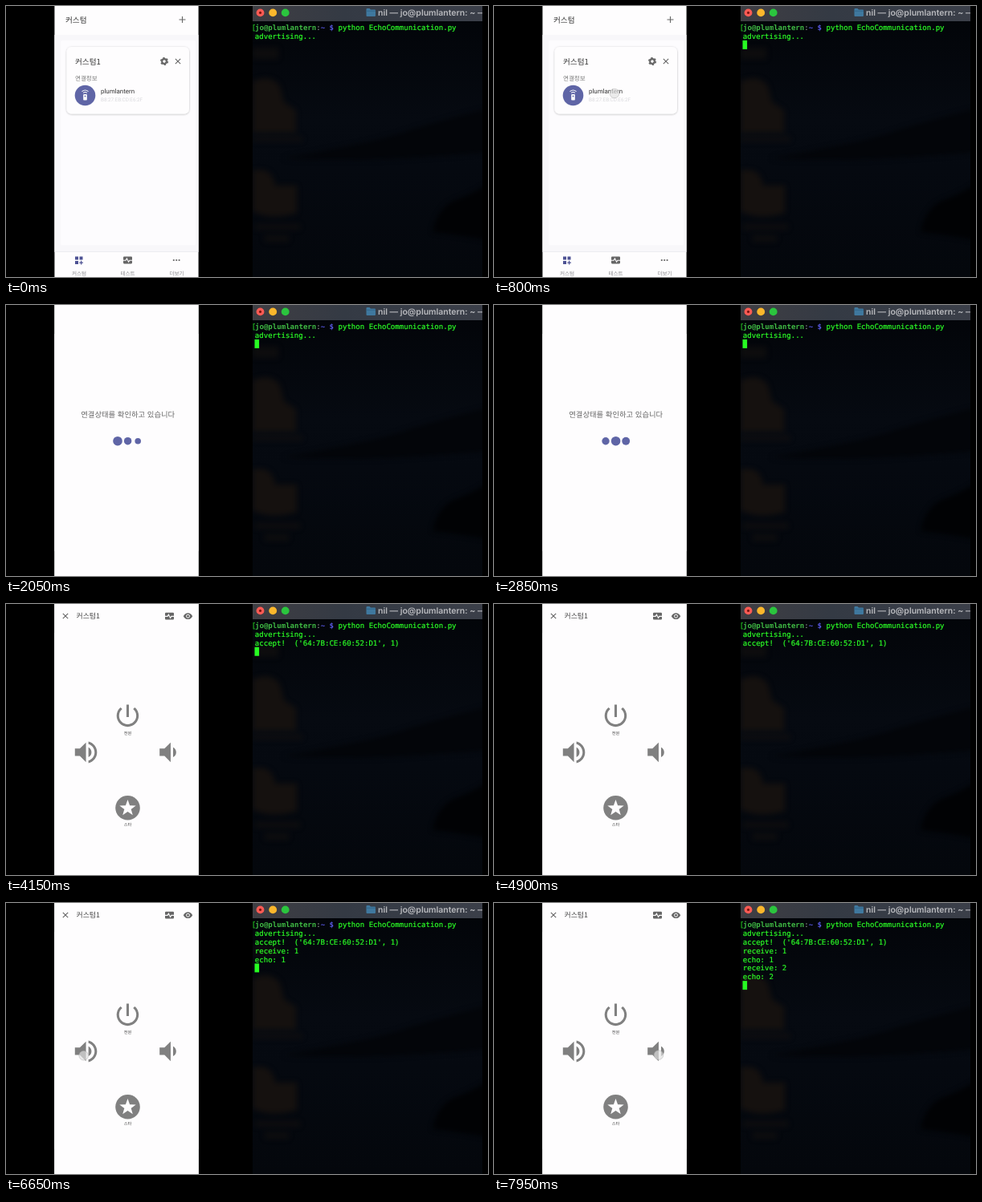
An HTML page for the animation above (8 s loop, 600 by 338 pixels).

```html
<!DOCTYPE html>
<html lang="ko">
<head>
<meta charset="utf-8">
<title>Echo demo</title>
<style>
  html, body { margin: 0; width: 100%; height: 100%; overflow: hidden; background: #000; }
  svg { display: block; width: 600px; height: 338px; }
  text { white-space: pre; text-rendering: geometricPrecision; }
  .ko { font-family: "Noto Sans CJK KR", "Noto Sans CJK", sans-serif; }
  .la { font-family: Roboto, sans-serif; }
  .mono { font: 9.05px "DejaVu Sans Mono", monospace; fill: #2bfc26; stroke: #2bfc26; stroke-width: .22; }
  .mono tspan { stroke: none; }
  .bar { font: 600 10.5px Inter, sans-serif; fill: #b9babe; }
  .mid { text-anchor: middle; }
  .line { fill: none; stroke: #666; stroke-width: 1.1; }
</style>
</head>
<body>
<svg viewBox="0 0 600 338">
  <defs>
    <clipPath id="phone"><rect x="60.400" width="179.200" height="338"/></clipPath>
    <clipPath id="win"><rect x="307" width="286" height="338"/></clipPath>
    <filter id="blur" x="-20%" y="-20%" width="140%" height="140%" color-interpolation-filters="sRGB"><feGaussianBlur stdDeviation="3"/></filter>
    <filter id="shade" x="-10%" y="-10%" width="120%" height="120%"><feDropShadow dx="0" dy=".6" stdDeviation="1" flood-opacity=".28"/></filter>
    <linearGradient id="sky" x2="0" y2="1">
      <stop offset="0" stop-color="#020408"/>
      <stop offset=".42" stop-color="#060a11"/>
      <stop offset=".6" stop-color="#050910"/>
      <stop offset="1" stop-color="#04070c"/>
    </linearGradient>
    <linearGradient id="chrome">
      <stop offset="0" stop-color="#3f3e43"/>
      <stop offset=".4" stop-color="#343a44"/>
      <stop offset="1" stop-color="#3b3f49"/>
    </linearGradient>
    <path id="cross" d="M-3.2-3.2 3.2 3.2M3.2-3.2-3.2 3.2"/>
    <path id="speaker" d="M3 9v6h4l5 5V4L7 9H3zm13.5 3c0-1.77-1.02-3.29-2.5-4.03v8.05c1.48-.73 2.5-2.25 2.5-4.02z"/>
    <g id="pulse">
      <rect x="-5.5" y="-4.4" width="11" height="8.8" rx="1.1" fill="#666"/>
      <path d="M-5.5.2H-2.4L-1.1-2 1.1 2.2 2.3.2H5.5" fill="none" stroke="#fefdfe" stroke-width="1.1"/>
    </g>
  </defs>
  <rect width="600" height="338"/>

  <g clip-path="url(#phone)">
    <g id="home">
      <rect x="60" width="180" height="338" fill="#fefdfe"/>
      <rect x="60" y="36" width="180" height="270" fill="#f8f7fa"/>
      <rect x="68" y="43" width="168" height="255.500" rx="2" fill="#fdfcfe"/>
      <path d="M60 306.500H240" stroke="#ececf0"/>
      <text class="ko" x="74" y="20.600" font-size="9.6" font-weight="500" fill="#333">커스텀</text>
      <path class="line" d="M215.500 17h8M219.500 13v8"/>
      <rect x="75.500" y="51" width="152.500" height="83.500" rx="6" fill="#fefdfe" filter="url(#shade)"/>
      <text class="ko" x="86" y="72.500" font-size="9.6" font-weight="500" fill="#333">커스텀1</text>
      <g transform="translate(197 69)" fill="none" stroke="#666">
        <circle r="2.800" stroke-width="2.200"/>
        <circle r="4.300" stroke-width="1.500" stroke-dasharray="2.400 2.103"/>
      </g>
      <use href="#cross" class="line" x="214" y="69"/>
      <text class="ko" x="86" y="93" font-size="7.5" fill="#777">연결정보</text>
      <circle cx="98.500" cy="111.500" r="12.800" fill="#5f65a6"/>
      <g transform="translate(98.500 111.500)" fill="none" stroke="#fff" stroke-width="1.100">
        <rect x="-2.300" y="-1.400" width="4.600" height="7.400" rx=".8" fill="#fff" stroke="none"/>
        <path d="M-2.400-3.100Q0-5 2.400-3.100M-4-4.900Q0-8 4-4.900"/>
        <circle cy="1" r=".9" fill="#5f65a6" stroke="none"/>
      </g>
      <text class="la" x="118" y="109" font-size="7.9" fill="#333">plumlantern</text>
      <text class="la" x="118" y="118.800" font-size="6.3" fill="#d9d9dc">B8:27:EB:CD:E6:2F</text>
      <path d="M86 312.500h4v4h-4zM91.500 312.500h4v4h-4zM86 318h4v4h-4zM93 317.800h1.200v1.700h1.700v1.200h-1.700v1.700H93v-1.700h-1.700v-1.200H93z" fill="#4d5293"/>
      <use href="#pulse" x="151.500" y="317"/>
      <g fill="#666"><circle cx="208.800" cy="317" r="1.100"/><circle cx="212.200" cy="317" r="1.100"/><circle cx="215.600" cy="317" r="1.100"/></g>
      <g class="ko mid" font-size="6.6" fill="#8c8c90">
        <text x="91" y="336.300">커스텀</text><text x="151.500" y="336.300">테스트</text><text x="212.500" y="336.300">더보기</text>
      </g>
    </g>

    <g id="load">
      <rect x="60" width="180" height="366" fill="#fefdfe"/>
      <text class="ko mid" x="151.700" y="139.500" font-size="9.36" fill="#666">연결상태를 확인하고 있습니다</text>
      <g id="dots" fill="#5f65a6"></g>
    </g>

    <g id="remote">
      <rect x="60" width="180" height="366" fill="#fefdfe"/>
      <use href="#cross" class="line" x="74" y="15"/>
      <text class="ko" x="87.500" y="18.300" font-size="8.9" font-weight="500" fill="#444">커스텀1</text>
      <use href="#pulse" x="203.500" y="15.200"/>
      <path d="M220.800 15.200Q223 11.300 226.500 11.300T232.200 15.200Q230 19.100 226.500 19.100T220.800 15.200Z" fill="#666"/>
      <circle cx="226.500" cy="15.200" r="2" fill="#666" stroke="#fefdfe"/>
      <g fill="#808080">
        <path transform="translate(133.100 121) scale(1.53)" d="M13 3h-2v10h2V3zm4.830 2.170l-1.420 1.420C17.990 7.860 19 9.810 19 12c0 3.870-3.130 7-7 7s-7-3.130-7-7c0-2.190 1.010-4.140 2.580-5.420L6.170 5.170C4.230 6.820 3 9.260 3 12c0 4.970 4.030 9 9 9s9-4.030 9-9c0-2.740-1.230-5.180-3.170-6.830z"/>
        <g transform="translate(81.200 166.600) scale(1.53)">
          <use href="#speaker"/>
          <path d="M14 3.230v2.060c2.890.86 5 3.540 5 6.710s-2.110 5.850-5 6.710v2.060c4.010-.91 7-4.490 7-8.770s-2.990-7.860-7-8.770z"/>
        </g>
        <use href="#speaker" transform="translate(186.600 166.600) scale(1.53)"/>
        <circle cx="151.500" cy="254.300" r="15.300"/>
      </g>
      <path id="star" fill="#fefdfe"/>
      <g class="ko mid" font-size="5.2" fill="#444"><text x="151.500" y="163">전원</text><text x="151.500" y="277">스타</text></g>
    </g>
    <circle id="touch" r="5.800" fill="#e2e2e2" fill-opacity=".65" stroke="#aaa" stroke-opacity=".6" stroke-width=".8"/>
  </g>

  <g clip-path="url(#win)">
    <rect x="307" width="286" height="338" fill="url(#sky)"/>
    <g filter="url(#blur)">
      <path d="M345 190Q410 178 440 172T500 156T600 128V182Q450 196 345 190Z" fill="#030509"/>
      <path d="M531 282Q538 250 560 242T600 222V292Q555 284 531 282Z" fill="#010204"/>
      <g fill="#15110f">
        <path d="M307 94Q330 84 341 100L346 120 361 130V158H307Z"/>
        <path d="M307 205Q332 200 335 224H362V258Q330 268 307 256Z"/>
        <path d="M307 52h32v14h-32zM307 163h62v6h-62zM310 272h56v7h-56zM322 286h30v8h-30z" opacity=".6"/>
      </g>
    </g>
    <rect x="307" width="286" height="19" fill="url(#chrome)"/>
    <circle cx="316.500" cy="8.400" r="4.900" fill="#fc5b54"/>
    <circle cx="316.500" cy="8.400" r="1.600" fill="#7a1512"/>
    <circle cx="332.200" cy="8.400" r="4.900" fill="#fbb72c"/>
    <circle cx="347.700" cy="8.400" r="4.900" fill="#2bc53e"/>
    <path d="M448.500 4q0-1 1-1h3l1.500 1.500h5q1 0 1 1V12q0 1-1 1h-9.500q-1 0-1-1z" fill="#3f789e"/>
    <path d="M448.500 6.300h11.500" stroke="#2f6388" stroke-width=".8"/>
    <text class="bar" x="463" y="12">nil — jo@plumlantern: ~ —</text>
    <text class="mono" x="305.700" y="29.800" fill-opacity=".5" stroke="none">[</text>
    <text class="mono" x="310" y="29.800"><tspan font-weight="700" fill="#3fb944">jo@plumlantern</tspan><tspan fill="#aaa">:</tspan><tspan font-weight="700" fill="#5757e0">~ $</tspan> python EchoCommunication.py</text>
    <g id="rows"></g>
    <rect id="caret" x="309.500" width="5.600" height="11" fill="#27fb22"/>
  </g>
</svg>
<script>
const LOOP = 8000, ROW = 10.85;
const $ = id => document.getElementById(id);
const clamp = v => Math.min(1, Math.max(0, v));
const set = (el, attrs) => { for (const k in attrs) el.setAttribute(k, attrs[k]); };
const add = (parent, tag, attrs) => {
  const el = document.createElementNS('http://www.w3.org/2000/svg', tag);
  set(el, attrs);
  return parent.appendChild(el);
};

const output = [
  [0, 'advertising...'],
  [2950, "accept!  ('64:7B:CE:60:52:D1', 1)"],
  [5850, 'receive: 1'], [5850, 'echo: 1'],
  [6950, 'receive: 2'], [6950, 'echo: 2']
];
const rows = output.map(([at, str], i) => {
  const el = add($('rows'), 'text', { class: 'mono', x: 309.8, y: 30.2 + ROW * (i + 1) });
  el.textContent = str;
  return { at, el };
});

const dots = [139, 151.6, 164.2].map(cx => add($('dots'), 'circle', { cx, cy: 169.7 }));

const star = Array.from({ length: 10 }, (_, i) => {
  const a = Math.PI * (i / 5 - 0.5), r = i % 2 ? 4.4 : 10.7;
  return [151.5 + r * Math.cos(a), 254.7 + r * Math.sin(a)].map(v => v.toFixed(2));
});
set($('star'), { d: 'M' + star.join('L') + 'Z' });

// from, to, x, y
const touches = [
  [700, 900, 150, 109],
  [5500, 5800, 156.8, 145.2],
  [6550, 6900, 96.7, 190.3],
  [7750, 8000, 205, 189.6]
];

// A page rises into place while it fades in.
function enter(el, t, start, dur) {
  const u = clamp((t - start) / dur);
  set(el, {
    visibility: u > 0 ? 'visible' : 'hidden',
    opacity: clamp((t - start) / 150),
    transform: `translate(0 ${(27 * (1 - u) ** 3).toFixed(2)})`
  });
}

function draw(t) {
  enter($('load'), t, 1085, 450);
  enter($('remote'), t, 3020, 360);

  dots.forEach((dot, i) => {
    const p = Math.max(0, t - 1120 - i * 156) / 625;
    set(dot, { r: 3.8 + 1 - Math.cos(p * 2 * Math.PI) });
  });

  const hit = touches.find(([a, b]) => t >= a && t < b);
  set($('touch'), hit
    ? { visibility: 'visible', cx: hit[2], cy: hit[3] }
    : { visibility: 'hidden' });

  let shown = 0;
  for (const { at, el } of rows) {
    const on = t >= at;
    set(el, { visibility: on ? 'visible' : 'hidden' });
    shown += on;
  }
  const blink = t % 1200;
  set($('caret'), {
    y: 21.2 + ROW * (shown + 1),
    visibility: blink >= 350 && blink < 950 ? 'visible' : 'hidden'
  });
}

const begin = performance.now();
function tick() {
  draw((performance.now() - begin) % LOOP);
  requestAnimationFrame(tick);
}
draw(0);
requestAnimationFrame(tick);
</script>
</body>
</html>
```
